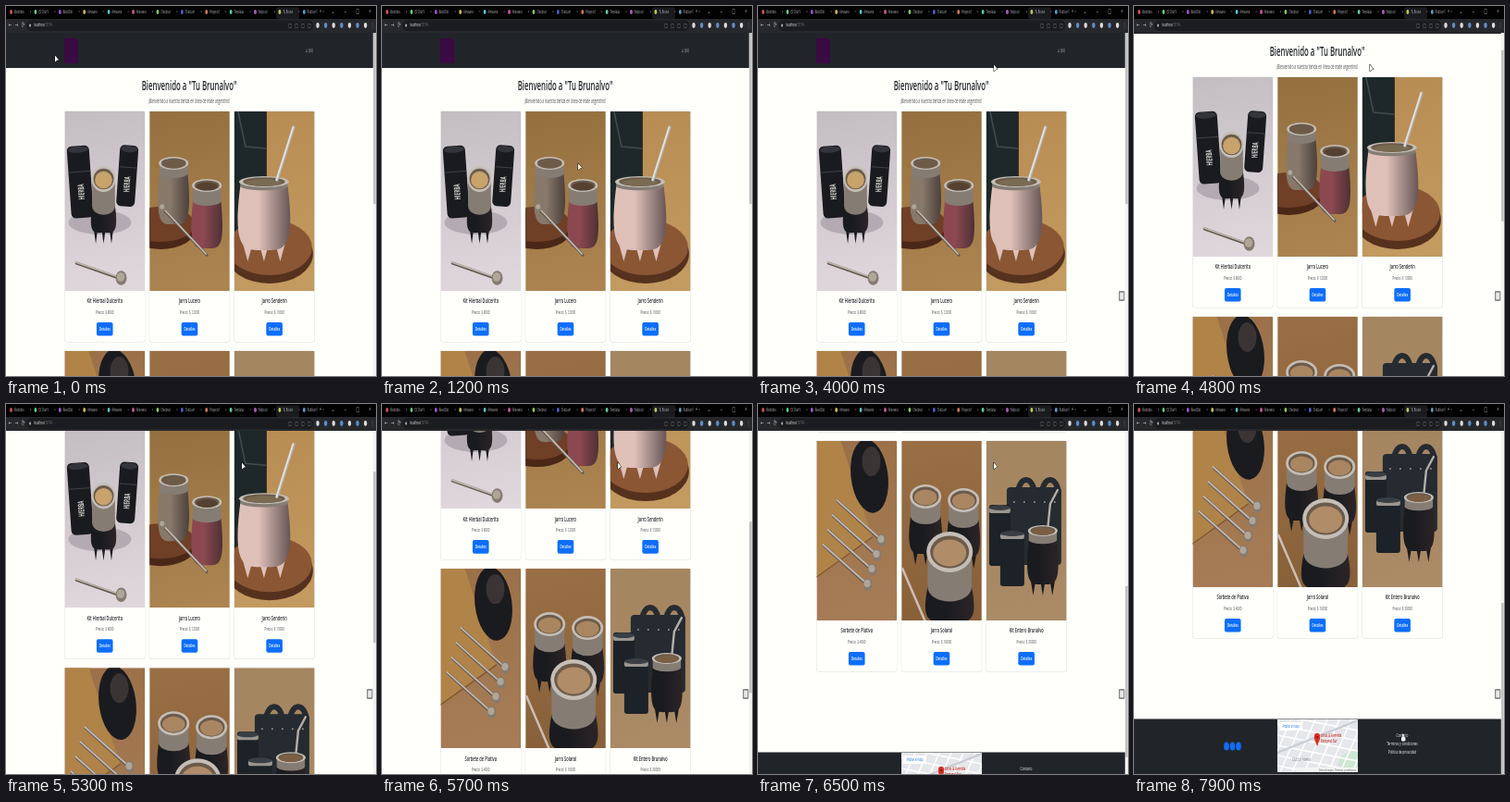
An HTML page with a canvas that plays this animation: 400 by 400 pixels, repeating every 8000 ms.

```html
<!DOCTYPE html>
<html lang="es">
<head>
<meta charset="utf-8">
<title>Tienda</title>
<style>
html, body { margin: 0; width: 100%; height: 100%; overflow: hidden; background: #fffffc; }
canvas { display: block; width: 400px; height: 400px; }
</style>
</head>
<body>
<canvas id="stage"></canvas>
<script>
const LOOP = 8000, STEP = 100, SQUASH = 0.52, TOP = 29, MAX_SCROLL = 369;
const CARD_W = 86.5, PHOTO_H = 194, ROWS = [114, 373];
const DARK = '#212529', BLUE = '#0d6efd', INK = '#1a1b1f', PAPER = '#fffffc', GREY = '#44484c';
const canvas = document.getElementById('stage');
const g = canvas.getContext('2d');
const dpr = window.devicePixelRatio || 1;
canvas.width = canvas.height = 400 * dpr;
g.scale(dpr, dpr);
g.lineCap = g.lineJoin = 'round';

function repeat(n, fn) {
  for (let i = 0; i < n; i++) fn(i);
}
function rect(color, x, y, w, h, r = 0) {
  g.fillStyle = color;
  g.beginPath();
  g.roundRect(x, y, w, h, r);
  g.fill();
}
function oval(color, x, y, rx, ry = rx, turn = 0) {
  g.fillStyle = color;
  g.beginPath();
  g.ellipse(x, y, rx, ry, turn, 0, 7);
  g.fill();
}
function trace(pts) {
  g.beginPath();
  for (let i = 0; i < pts.length; i += 2) g.lineTo(pts[i], pts[i + 1]);
}
function poly(color, ...pts) {
  g.fillStyle = color;
  trace(pts);
  g.fill();
}
function line(color, width, ...pts) {
  g.strokeStyle = color;
  g.lineWidth = width;
  trace(pts);
  g.stroke();
}
function inside(x, y, w, h, paint) {
  g.save();
  g.beginPath();
  g.rect(x, y, w, h);
  g.clip();
  paint();
  g.restore();
}
function text(s, x, y, size, color, align = 'center', weight = 400) {
  g.save();
  g.translate(x, y);
  g.scale(SQUASH, 1);
  g.font = `${weight} ${size}px "Open Sans", "DejaVu Sans", sans-serif`;
  g.textAlign = align;
  g.textBaseline = 'middle';
  g.fillStyle = color;
  g.fillText(s, 0, 0);
  g.restore();
}

// Photo pieces use coordinates inside one 87 by 194 photo.
function backdrop(a, b) {
  const f = g.createLinearGradient(0, 0, 40, PHOTO_H);
  f.addColorStop(0, a);
  f.addColorStop(1, b);
  rect(f, 0, 0, 87, PHOTO_H);
}
function cup(x, y, rx, ry, depth, body, collar, hole, legs = 0) {
  const neck = y + collar, low = y + depth, side = rx * 0.95;
  repeat(legs, i => {
    const foot = x + (i - 1) * rx * 0.65;
    poly(body, foot - rx * 0.35, low - 22, foot + rx * 0.35, low - 22, foot, low + 12);
  });
  const shade = g.createLinearGradient(x - rx, 0, x + rx * 1.6, 0);
  shade.addColorStop(0.3, body);
  shade.addColorStop(1, '#33282a');
  g.fillStyle = shade;
  g.beginPath();
  g.moveTo(x - side, neck);
  g.bezierCurveTo(x - rx * 1.3, low + 4, x - rx * 0.7, low, x, low);
  g.bezierCurveTo(x + rx * 0.7, low, x + rx * 1.3, low + 4, x + side, neck);
  g.fill();
  oval('#857d74', x, neck, side, ry * 0.7);
  rect('#857d74', x - side, y, side * 2, collar);
  oval('#c4beb6', x, y, rx, ry);
  oval('#6b5b4b', x, y, rx * 0.84, ry * 0.8);
  oval(hole, x, y + 1, rx * 0.72, ry * 0.66);
}
function straw(x1, y1, x2, y2, bulb) {
  line('#65594f', 3.2, x1 + 0.8, y1 + 1, x2, y2 + 1);
  line('#c0b8b0', 1.8, x1, y1, x2, y2);
  oval('#857b70', x2, y2, bulb, bulb * 1.3);
  oval('#b0a698', x2 - 0.5, y2 - 1, bulb * 0.7, bulb * 0.8);
}
function tin(x, y, w, h, tilt, label) {
  g.save();
  g.translate(x, y);
  g.rotate(tilt);
  rect(INK, 0, 0, w, h, 5);
  oval('#34353a', w / 2, 4, w / 2 - 1, 3.5);
  line('#4a4b50', 0.8, 1, h * 0.36, w - 1, h * 0.36);
  g.translate(w * 0.55, h * 0.64);
  g.rotate(-Math.PI / 2);
  text(label, 0, 0, 9, '#d5d3d1', 'center', 700);
  g.restore();
}
function canister(x, y, w, h) {
  rect('#1d2228', x, y, w, h, 3);
  rect('#9a958e', x, y + 3, w, 6, 2);
  oval('#3a3f45', x + w / 2, y + 3, w / 2, 3);
}

const photos = [
  () => {
    backdrop('#c3bdc1', '#e0d7dd');
    oval('#b3abb1', 38, 120, 34, 13);
    tin(2, 38, 24, 78, -0.07, 'HIERBA');
    tin(60, 36, 20, 66, 0.07, 'HIERBA');
    cup(42, 73, 13, 14, 58, INK, 29, '#c8a36c', 3);
    straw(12, 163, 61, 180, 6);
  },
  () => {
    backdrop('#94703f', '#ac8450');
    oval('#4b2718', 12, 127, 38, 22);
    oval('#6f3f26', 12, 122, 37, 19);
    cup(26, 56, 16, 7, 66, '#877869', 11, '#6d5b47');
    cup(62, 80, 16, 7, 68, '#8b4850', 17, '#554131');
    straw(61, 154, 14, 104, 3.5);
  },
  () => {
    backdrop('#b78c53', '#c39a60');
    rect('#1e2829', -4, -6, 39, 155, 8);
    line('#424c4c', 1.5, 4, 0, 12, 38, 34, 40);
    oval('#56311d', 38, 154, 47, 32);
    oval('#8b5634', 38, 147, 46, 30);
    cup(32, 76, 27, 6, 74, '#dfc0b9', 5, '#796a52', 3);
    line('#b3b1ae', 3.4, 46, 74, 64, 17);
    line('#e8e5e3', 1.6, 45.5, 74, 63.5, 17);
  },
  () => {
    backdrop('#9b7048', '#a67c56');
    poly('#b08348', 0, 0, 26, 0, 60, 104, 0, 148);
    line('#7f5831', 1.5, 0, 147, 60, 104);
    oval(INK, 57, 38, 20, 40, -0.12);
    oval('#3a3435', 59, 22, 10, 16);
    repeat(4, i => straw(22 - i * 5, 64 + i * 16, 70 - i * 5, 107 + i * 16, 5));
  },
  () => {
    backdrop('#9b6f45', '#876039');
    repeat(2, i => cup(26 + i * 41, 60 + i * 4, 17, 13, 62, INK, 21, '#aa8660', 3));
    cup(52, 120, 25, 22, 76, INK, 38, '#b18c69');
    line('#cabfb4', 2.5, 1, 138, 26, 196);
  },
  () => {
    backdrop('#a38560', '#ab8a66');
    rect('#252b31', 22, 50, 59, 84, 4);
    repeat(2, i => {
      g.strokeStyle = '#252b31';
      g.lineWidth = 6;
      g.beginPath();
      g.ellipse(43 + i * 26, 58, 9, 16, 0, Math.PI, 0);
      g.stroke();
    });
    repeat(5, i => oval('#99948a', 30 + i * 11, 66, 1));
    canister(3, 69, 23, 66);
    canister(15, 97, 26, 60);
    line('#b5aea7', 2.4, 66, 98, 69, 68, 77, 53);
    cup(61, 97, 16, 6, 58, INK, 10, '#7b5f45', 3);
  }
];
const goods = [
  ['Kit Hierbal Dulcerito', 8000], ['Jarro Lucero', 12000], ['Jarro Senderin', 13000],
  ['Sorbete de Plativa', 4000], ['Jarro Solaral', 16000], ['Kit Entero Brunalvo', 30000]
];

function card(i) {
  const x = 63.5 + (i % 3) * 91.7, y = ROWS[Math.floor(i / 3)], mid = x + CARD_W / 2;
  rect('#dedede', x - 0.4, y - 0.4, CARD_W + 0.8, 249.8, 2);
  rect(PAPER, x, y, CARD_W, 249, 2);
  inside(x, y, CARD_W, PHOTO_H, () => {
    g.translate(x, y);
    photos[i]();
  });
  const [name, price] = goods[i];
  text(name, mid, y + 205.5, 7.6, DARK, 'center', 600);
  text('Precio: $ ' + price, mid, y + 217.5, 5.8, GREY);
  rect(BLUE, mid - 8.8, y + 228, 17.6, 14.6, 2);
  text('Detalles', mid, y + 235.5, 5.9, '#fff', 'center', 600);
}

function map() {
  rect('#e5e7ea', 155, 710, 87, 57);
  oval('#cfe6d2', 240, 762, 20, 18);
  repeat(11, k => {
    line('#fff', 1.5, 119 + k * 13, 767, 144 + k * 13, 710);
    line('#fff', 1.5, 155, 683 + k * 11, 242, 700 + k * 11);
  });
  line('#c8ced5', 2.4, 155, 746, 242, 711);
  rect('#fff', 157, 713, 25, 9, 1);
  text('Ampliar el mapa', 169.5, 717.5, 4.6, '#1a73e8');
  poly('#d93025', 195, 731, 201, 731, 198, 739);
  oval('#d93025', 198, 729, 3.2, 4.3);
  oval('#8c1a13', 198, 729, 1.2, 1.6);
  text('Lirios & Avenida', 202, 728, 5.5, '#c5221f', 'left', 600);
  text('Fontanal Sur', 202, 734, 5.5, '#c5221f', 'left', 600);
  text('Club Los Álamos', 181, 754, 5, '#65717d');
  rect('#f4f4f4', 176, 762, 66, 5);
  text('Datos de mapas   Términos y condiciones', 240, 764.5, 4, '#555', 'right');
}

function page(scroll) {
  inside(0, TOP, 400, 400 - TOP, () => {
    g.translate(0, -scroll);
    rect(DARK, 0, 29, 397, 38);
    rect('#3a0a42', 63, 35, 15, 27);
    text('⊔ ($0)', 328, 49, 5.5, '#a8abad');
    text('Bienvenido a "Tu Brunalvo"', 198, 87, 15, DARK, 'center', 600);
    text('¡Bienvenido a nuestra tienda en línea de mate argentino!', 198, 103, 6.4, GREY);
    goods.forEach((_, i) => card(i));
    rect(DARK, 0, 709.5, 397, 60);
    repeat(3, i => oval(BLUE, 100 + i * 6.5, 739, 2.8, 4.6));
    ['Contacto', 'Términos y condiciones', 'Política de privacidad'].forEach((s, i) =>
      text(s, 290, 727 + i * 9.2, 5.9, '#fff'));
    inside(155, 710, 87, 57, map);
  });
  rect('#f3f3f1', 396.8, TOP, 3.2, 371);
  rect('#bcbcbc', 397.2, TOP + scroll / MAX_SCROLL * 186, 2.4, 185);
}

const tabs = ['Recibidos', '(3) Chat V', 'ReactDoc', 'Almavera', 'Almavera', 'Almavera', 'Checkout',
  'ChatLum', 'Proyecto1', 'Tiendaluz', 'Nidocod', 'Tu Brunal', 'Publicar F'];

function browser() {
  rect('#020203', 0, 0, 400, 14);
  rect('#27282b', 0, 14, 400, 15);
  rect('#1a1b1e', 292, 1.5, 25, 12.5, 2);
  tabs.forEach((s, i) => {
    const x = 4 + i * 26.4;
    oval(`hsl(${i * 137} 55% 58%)`, x + 1.5, 6.5, 1.4, 2.4);
    text(s, x + 5, 6.5, 4.6, '#bfc0c3', 'left');
    text('×', x + 22.5, 6.5, 4.6, '#97989b');
  });
  ['+', '⌄', '–', '□', '×'].forEach((s, i) => text(s, 340 + i * 13.4, 6.5, 7, '#c4c4c4'));
  ['←', '→', '⟳'].forEach((s, i) => text(s, 4.5 + i * 7, 21, 8, '#b5b6b8'));
  rect('#1b1c1f', 22, 15.5, 310, 11.5, 5);
  oval('#aaa', 26, 21, 1, 1.8);
  text('localhost', 30, 21, 5.4, '#f0f0f0', 'left');
  text(':5174', 42.5, 21, 5.4, '#86888d', 'left');
  repeat(4, i => text('□', 307 + i * 7, 21, 6, '#b5b6b8'));
  repeat(7, i => oval(i % 2 ? '#5d8fd0' : '#dcdcdc', 337 + i * 8.6, 21, 1.7, 2.9));
  text('⋮', 396, 21, 7, '#ccc');
}

function pointer([x, y], hand) {
  g.save();
  g.translate(x, y);
  if (hand) {
    rect('#fff', -2, 0, 4.4, 4.4, 1.2);
    rect('#fff', -0.8, -3.5, 1.4, 5, 0.7);
  } else {
    const arrow = [-2, -3.5, -2, 3.5, 0.4, 1.6, 2, 1.2, -2, -3.5];
    line('#111', 1, ...arrow);
    poly('#fff', ...arrow);
  }
  g.restore();
}

function ease(t, start, span) {
  const u = Math.min(1, Math.max(0, (t - start) / span));
  return u * u * (3 - 2 * u);
}
// Wheel: one lone notch, a quick burst, then a slower one; each notch glides.
function scrollAt(t) {
  let notches = ease(t, 4640, 150);
  repeat(5, i => notches += ease(t, 5101 + i * 137, 150));
  repeat(4, i => notches += ease(t, 5950 + i * 200, 150));
  return Math.min(MAX_SCROLL, notches * 37);
}
// Rest points of the pointer, joined by eased moves
const spots = [[55, 57], [404, 313], [257, 67], [291, 360]];
const moves = [[400, 1700], [2700, 900], [6800, 800]];
function pointerAt(t) {
  return moves.reduce((p, [start, span], i) =>
    p.map((v, axis) => v + (spots[i + 1][axis] - v) * ease(t, start, span)), spots[0]);
}

function draw(t) {
  rect(PAPER, 0, 0, 400, 400);
  page(scrollAt(t));
  browser();
  g.globalAlpha = ease(t, 2000, 900);
  rect('#888', 390, 308, 6.4, 11, 1);
  rect('#e6e6e6', 391.2, 309.8, 4, 7.4, 0.5);
  g.globalAlpha = 1;
  pointer(pointerAt(t), t >= 7600);
}
let start;
function tick(now) {
  start ??= now;
  draw(Math.floor((now - start) % LOOP / STEP) * STEP);
  requestAnimationFrame(tick);
}
requestAnimationFrame(tick);
</script>
</body>
</html>
```
